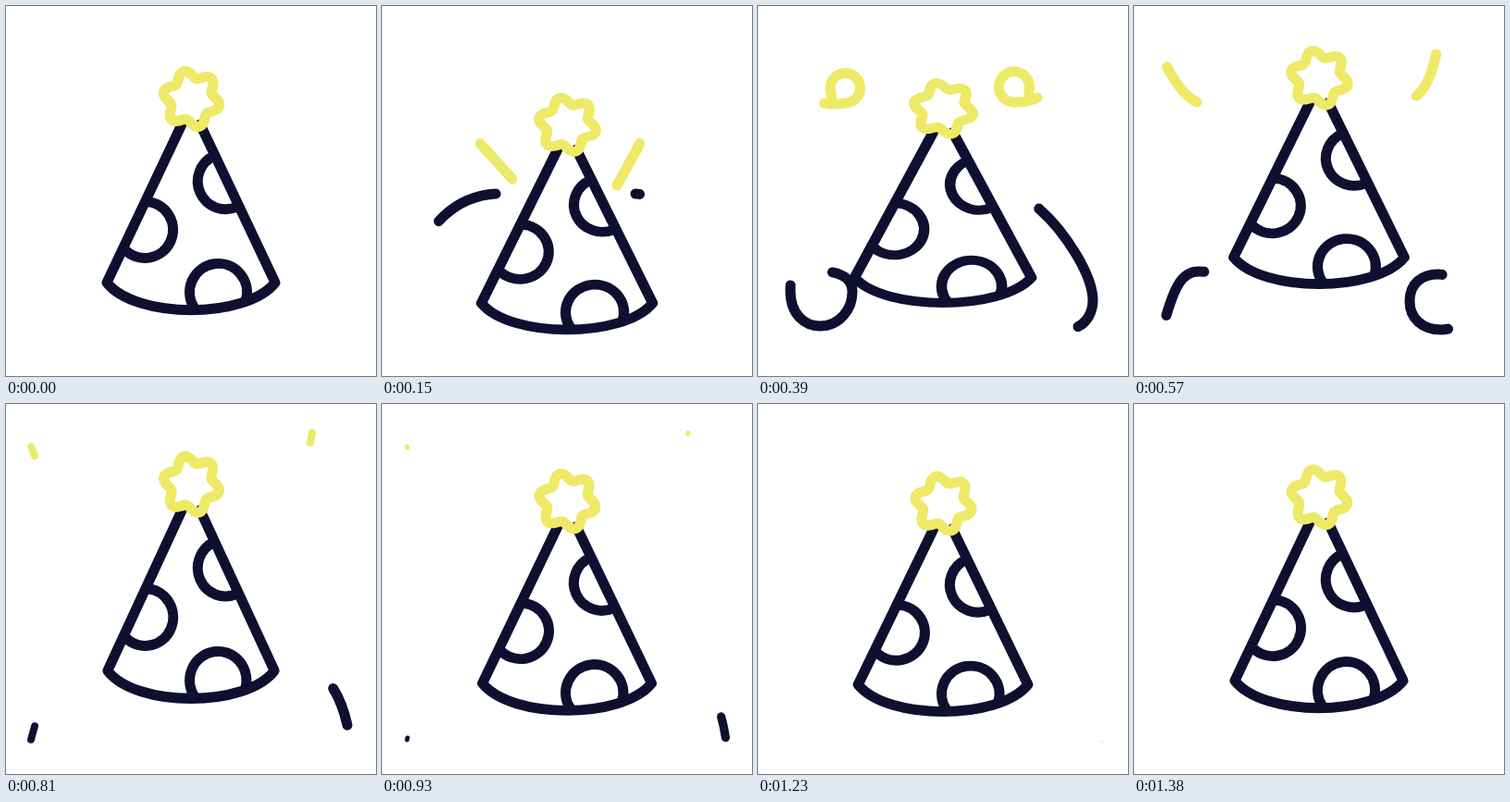
Animation of 400x400 px, one loop 1410 ms. Source, as an HTML page:

```html
<!DOCTYPE html>
<html lang="en">
<head>
<meta charset="utf-8">
<title>Party hat</title>
<style>
  html, body { margin: 0; width: 100%; height: 100%; overflow: hidden; background: #fff; }
  svg { display: block; fill: none; stroke: #0f0f30; stroke-width: 11; stroke-linecap: round; stroke-linejoin: round; }
  .yellow { stroke: #eee966; }
</style>
</head>
<body>
<svg width="400" height="400" viewBox="0 0 400 400">
  <g id="hat">
    <path d="M190 128L109 299C140 338.5 260 338.5 291 299L210 128"/>
    <path d="M225 162A30 30 0 0 0 250 217M152 211.5A30.5 30.5 0 1 1 129 264M204 327A31 31 0 1 1 259 319"/>
    <path id="star" class="yellow"/>
  </g>
  <path class="streamer yellow" pathLength="1" d="M141 187L110 153Q80 122 79 94A16.2 16.2 0 1 1 94 105C80 107 72 106 66 103C48 92 34 65 27 46"/>
  <path class="streamer yellow" pathLength="1" d="M254 194L276 154Q292 122 293 92A16.6 16.6 0 1 0 278 104C292 104 301 101 308 95C322 82 327 51 331 31"/>
  <path class="streamer" pathLength="1" d="M123 203Q91 205 68 226C46 246 35 276 35 308C35 334 51 346 67 346C88 346 102 328 102 309C102 294 88 287 70 287C48 287 41 311 27 363"/>
  <path class="streamer late" pathLength="1" d="M274 203Q284 203 295 212C328 236 362 290 362 318C362 336 350 350 332 350C312 350 298 338 298 319S311 290 329 290C352 290 368 330 372 365"/>
</svg>
<script>
const LOOP = 1410, FLOOR = 328.5, TAIL_LAG = 172;
const hat = document.getElementById('hat');
const streamers = document.querySelectorAll('.streamer');

// Extremes of the bounce and of the squash, as [time, value]
const bounce = [[0, 0], [160, 21.5], [575, -28], [1050, 8], [LOOP, 0]];
const squash = [[0, 1], [370, .92], [740, 1.02], [1070, .974], [LOOP, 1]];

// Cosine swing from one extreme to the next
function swing(keys, t) {
  const next = keys.findIndex(([time]) => time > t);
  const [t0, a] = keys[next - 1], [t1, b] = keys[next];
  return a + (b - a) * (1 - Math.cos(Math.PI * (t - t0) / (t1 - t0))) / 2;
}

// Same curve as the CSS "ease" timing function
function ease(x) {
  if (x <= 0 || x >= 1) return x <= 0 ? 0 : 1;
  let low = 0, high = 1, s;
  for (let i = 0; i < 20; i++) {
    s = (low + high) / 2;
    if (.75 * s * (1 - s) + s ** 3 < x) low = s; else high = s;
  }
  return .3 * s * (1 - s) ** 2 + 3 * s * s * (1 - s) + s ** 3;
}

function starPath() {
  const points = [];
  for (let deg = 0; deg < 360; deg += 3) {
    const a = deg * Math.PI / 180;
    const r = 26.8 + 4.2 * Math.cos(6 * a - 84 * Math.PI / 180);
    points.push([200.5 + r * Math.cos(a), 100.5 + r * Math.sin(a)]);
  }
  return `M${points.join('L')}Z`;
}

function drawHat(t) {
  const sy = swing(squash, t), sx = sy ** -.6;
  hat.setAttribute('transform',
    `translate(200 ${FLOOR + swing(bounce, t)}) scale(${sx} ${sy}) translate(-200 ${-FLOOR})`);
}

function drawStreamer(path, t) {
  const [start, duration] = path.classList.contains('late') ? [130, 930] : [35, 800];
  const head = ease((t - start) / duration);
  const tail = ease((t - start - TAIL_LAG) / duration);
  path.style.strokeDasharray = `${head - tail} 2`;
  path.style.strokeDashoffset = -tail;
  path.style.strokeWidth = head > tail ? Math.min(11, 18 * (1 - tail) ** .25) : 0;
}

function frame() {
  const t = performance.now() % LOOP;
  drawHat(t);
  streamers.forEach(path => drawStreamer(path, t));
  requestAnimationFrame(frame);
}

document.getElementById('star').setAttribute('d', starPath());
frame();
</script>
</body>
</html>
```
